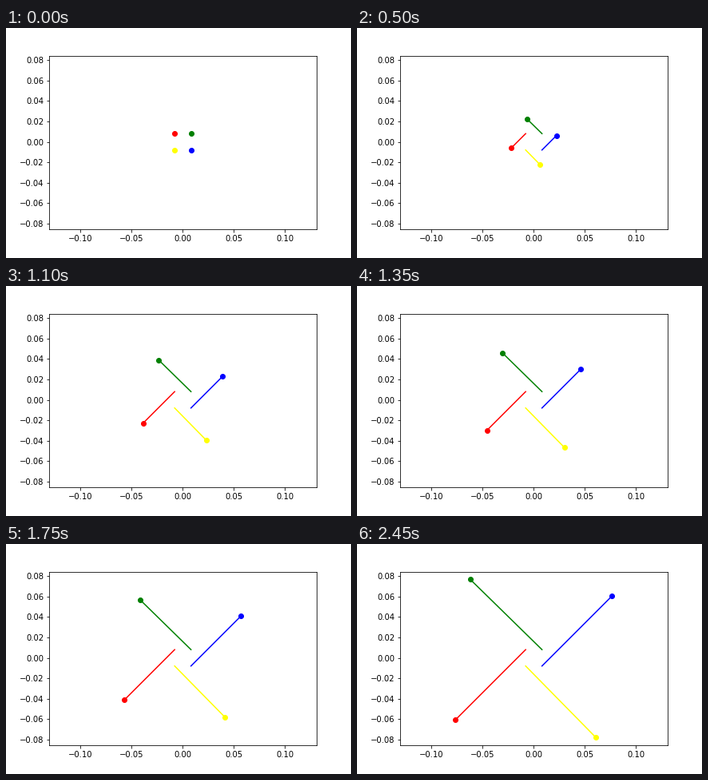
A matplotlib script that plays this animation: 432x288 px, repeating every 2500 ms.

```python
import numpy as np
import matplotlib.pyplot as plt
from matplotlib.animation import FuncAnimation

FRAMES = 50
INTERVAL = 50
SCALE = 1280          # pixels per data unit on both axes
START = 0.008
SPEED = 0.0014

# colour, start position, step per frame
PARTICLES = [
    ("red", (-START, START), (-SPEED, -SPEED)),
    ("green", (START, START), (-0.00143, SPEED)),
    ("blue", (START, -START), (SPEED, SPEED)),
    ("yellow", (-START, -START), (SPEED, -0.001425)),
]

plt.rcParams["font.family"] = "DejaVu Sans"
fig = plt.figure(figsize=(6, 4), dpi=72, facecolor="white")
ax = fig.add_axes([0.125, 0.125, 0.775, 0.755])

half_w = 0.775 * 432 / SCALE / 2
half_h = 0.755 * 288 / SCALE / 2
y_mid = -0.0006
ax.set_xlim(-half_w, half_w)
ax.set_ylim(y_mid - half_h, y_mid + half_h)
ax.set_xticks(np.arange(-2, 3) * 0.05)
ax.set_yticks(np.arange(-4, 5) * 0.02)

trails = [ax.plot([], [], color=c, lw=1.5)[0] for c, _, _ in PARTICLES]
dots = [ax.plot([], [], "o", color=c, ms=6)[0] for c, _, _ in PARTICLES]


def update(i):
    for (_, start, step), trail, dot in zip(PARTICLES, trails, dots):
        x, y = np.array(start) + i * np.array(step)
        trail.set_data([start[0], x], [start[1], y])
        dot.set_data([x], [y])
    return trails + dots


anim = FuncAnimation(fig, update, frames=FRAMES, interval=INTERVAL,
                     repeat=True, repeat_delay=0)
plt.show()
```
